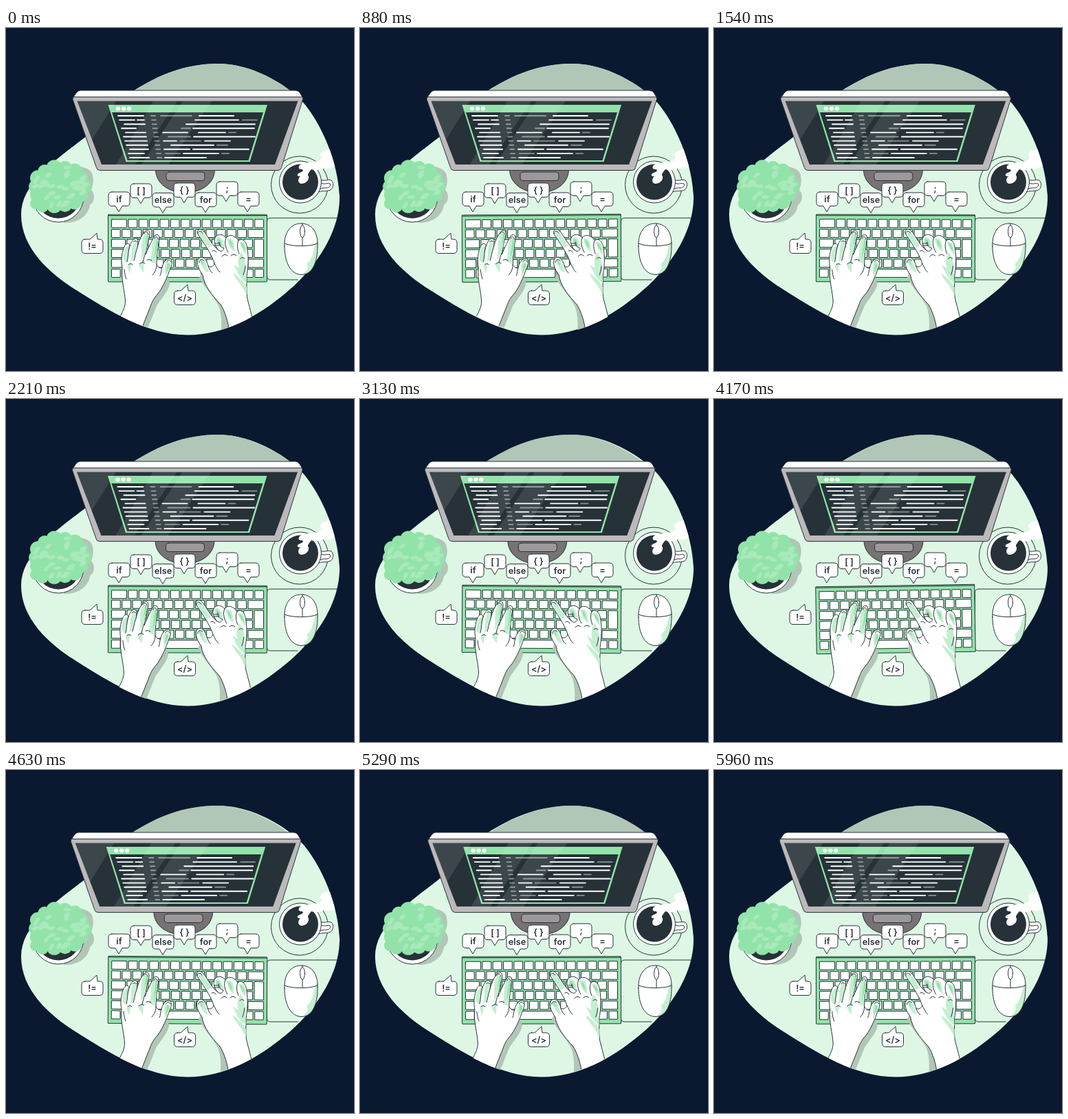
These frames come from a looping animation (506 by 500 pixels, 6000 ms). An HTML page:

```html
<!DOCTYPE html>
<html lang="en">
<head>
<meta charset="utf-8">
<title>Typing at the desk</title>
<style>
html, body { margin: 0; width: 100%; height: 100%; overflow: hidden; background: #0a192f; }
svg { display: block; width: 506px; height: 500px; }
text { font: 600 12.7px Inter, "Open Sans", sans-serif; text-anchor: middle; fill: #263238; }
.ink { stroke: #263238; stroke-width: 1; stroke-linejoin: round; stroke-linecap: round; }
.white { fill: #fff; }
.none { fill: none; }
.green { fill: #92e3a9; }
.pale { fill: #c3efd0; }
.dark { fill: #263238; }
.shade { fill: #b2c6b7; }
</style>
</head>
<body>
<svg viewBox="0 0 506 500">
  <defs>
    <path id="blob" d="M308 52C350 52 393 73 424 100C447 121 482 181 485 245C486 303 443 357 406 387C365 421 318 447.500 264 447.500C205 447.500 150 412 102 382C62 357 22 320 22 272C22 227 70 194 114 160C137 141 160 108 185 92C222 68 262 52 308 52Z"/>
    <clipPath id="desk"><use href="#blob"/></clipPath>
    <path id="shell" d="M405 318C404 298 414 285 429 285C445 285 454 298 453 318C453 342 445 359.500 430 359.500C414 359.500 405 342 405 318Z"/>
    <clipPath id="body"><use href="#shell"/></clipPath>
  </defs>
  <use href="#blob" fill="#def7e5"/>

  <g id="plant">
    <path class="shade" d="M92 200C108 201 126 204 126 216C128 222 126 230 124 236C131 244 128 254 122 258C120 274 104 285 84 284Z"/>
    <circle class="white ink" cx="76" cy="246" r="37"/>
    <circle class="dark" cx="76" cy="245" r="32.500"/>
    <g id="bush"></g>
  </g>

  <g id="cup">
    <circle class="none ink" cx="427" cy="228.500" r="41.500" stroke-width=".8"/>
    <path class="white ink" d="M455 221C464 224 468 220 473 222C477 226 476 233 472 236C466 239 460 236 452 240Z"/>
    <path class="none ink" d="M458 226C464 229 468 225 471 227C473 230 470 233 466 233C462 233 459 233 456 235"/>
    <circle class="white ink" cx="428" cy="224.500" r="30.500"/>
    <circle class="dark" cx="428" cy="224.500" r="26"/>
    <path class="white" clip-path="url(#desk)" d="M480 176C466 177 455 180 457 187C461 188 459 191 456 193C448 196 437 196 430 198C424 201 424 206 430 206C434 207 431 210 427 211C422 213 423 217 428 216C424 220 424 226 429 227C436 227 441 222 440 216C437 214 441 210 444 206C450 208 459 208 462 204C470 207 478 202 486 200Z"/>
  </g>

  <g id="mouse">
    <path class="none ink" d="M481 277H384.500Q379.500 277 379.500 282V362Q379.500 367 384.500 367H424"/>
    <path class="pale" d="M440 291C455 300 458 340 436 358L428 340Z"/>
    <use href="#shell" class="white"/>
    <path class="pale" clip-path="url(#body)" d="M453 310C446 316 450 334 437 344C441 348 438 354 430 360L456 362Z"/>
    <use href="#shell" class="none ink"/>
    <path class="none ink" d="M405 314C414 319 444 319 453 314M431 285V288M431 305V317.500"/>
    <ellipse class="white ink" cx="431" cy="296.500" rx="3.400" ry="9"/>
  </g>

  <g id="monitor">
    <path class="shade" d="M185 92C222 68 262 52 308 52C350 52 393 73 424 100H185Z"/>
    <path class="ink" fill="#777274" d="M217.500 206C217.500 227 237 240 260.500 240C284 240 303.500 227 303.500 206Z"/>
    <rect class="ink" fill="#9d999b" x="233" y="210" width="56" height="12.500" rx="4"/>
    <path class="white ink" d="M98 101C102 95 104 91 109 91H420C426 91 428 95 431 101Z"/>
    <path class="ink" fill="#bcb9bb" d="M99 100.500H429.500Q432.500 100.500 431.500 104L400.500 203.500Q399.500 207.500 396 207.500H136.500Q132.500 207.500 131.500 203.500L97 104Q96.500 100.500 99 100.500Z"/>
    <path class="dark" d="M103.500 106.500H424.500L391 199H139Z"/>
    <path class="green" d="M148.500 112H380L354.500 195H174.500Z"/>
    <path class="dark" d="M154 123H374L352.500 193H176.500Z"/>
    <g class="white">
      <ellipse cx="163" cy="117.500" rx="3.200" ry="2.900"/>
      <ellipse cx="171" cy="117.500" rx="3.200" ry="2.900"/>
      <ellipse cx="179" cy="117.500" rx="3.200" ry="2.900"/>
    </g>
    <g id="code" stroke-width="1.900" stroke-linecap="round"></g>
    <path class="white" opacity=".1" d="M103.500 106.500H160L125 163ZM214 106.500H249L188 199H160ZM257 106.500H299L236 199H197Z"/>
  </g>

  <g id="bubbles"></g>

  <g id="keyboard">
    <rect class="green ink" x="148.500" y="272" width="231" height="98" rx="1"/>
    <path class="none ink" d="M149 273.500H379" stroke-width=".7"/>
    <g id="keys"></g>
  </g>

  <g id="hands"><g clip-path="url(#desk)">
    <path class="shade" d="M232 354L238 372C237 384 222 398 218 408L203 445H180ZM286 352L281 364C290 380 303 393 309 405C314 417 314 434 312 450H340Z"/>
    <path class="white ink" d="M152 446C164 422 173 412 173.500 399C173 384 167 367 169 350C167 338 168 328 172 319C174 313 180 313 180 318C182 311 186 306 190 307C193 309 192 314 191 320C193 310 199 299 203 295.500C208 293.500 210 298 208.500 304C206 312 204 321 203 330C207 320 213 308 216 303C220 299 224 302 222.500 309C221 320 219 332 219 345C222 350 225 351 227 349C228 343 232 337 237 336C243 336 242 344 239 350C235 362 229 376 222 386C214 395 212 400 210 406L195 444Z"/>
    <path class="pale" d="M171 338C169 328 173 316 180 319C177 326 180 333 174 342ZM203 298C209 299 206 312 203 328L196 338C200 324 193 313 203 298ZM216 305C226 306 218 329 218 344L209 340C214 329 209 318 216 305ZM233 342C244 340 238 352 231 365C234 354 228 350 233 342ZM188 310C195 314 188 325 186 337L181 341C185 329 180 319 188 310ZM176 347L183 341L180 358ZM193 346L201 337L200 357Z"/>
    <path class="green" d="M177 319l3-1-3 12zM205 300q5 2 1 9l-4 9zM219 306q4 4 0 19l-4 12zM235 343q5-1 2 7l-4 8z"/>
    <path class="none ink" d="M180 318C177 326 178 335 176 341M191 320C188 328 188 334 186 339M203 328C201 333 200 337 199 341M219 345C219 352 216 357 213 360M227 349C225 354 226 358 224 361M201 300C201 296 207 296 207 301M216 307C216 303 221 303 221 308M234 341C234 338 239 337 240 341M185 312Q188 308 191 312M178 345Q181 342 184 345M194 344Q198 340 202 343M205 338Q209 336 212 339M172 352Q173 362 175 366"/>
    <path class="white ink" d="M325 446C324 430 318 412 312 403C299 389 288 375 286 360C280 352 276 342 280 336C286 331 292 338 294 347C298 350 302 347 303 343C300 333 292 320 286 311C282 304 275 298 280 294C285 291 290 299 293 304C299 314 305 321 309 324C304 318 301 310 305 304C310 299 316 301 320 306C325 299 334 303 338 310C344 305 350 312 351 322C353 335 352 350 350 362C350 380 349 389 352 399C355 410 358 422 363 443Z"/>
    <path class="pale" d="M342 327C349 336 349 348 350 372C341 366 338 360 331 345L339 350C336 342 338 332 342 327ZM330 357C340 364 347 371 350 378L350 391C345 375 333 367 330 357ZM282 337C290 337 291 345 295 356C290 357 283 347 282 337ZM281 296C289 297 292 307 300 318L294 320C288 311 279 302 281 296ZM306 306C313 302 316 311 318 320C309 320 304 314 306 306ZM321 307C331 304 332 314 333 326C325 323 324 315 321 307ZM339 312C349 310 350 319 350 331C344 326 343 319 339 312Z"/>
    <path class="green" d="M307 307q6 0 7 11q-7-3-7-11zM324 309q5 0 6 12q-5-4-6-12zM341 313q6 2 7 12q-5-4-7-12zM282 338q4 1 6 8q-5-2-6-8z"/>
    <path class="none ink" d="M279 300C279 295 284 295 286 299M281 342C280 338 285 336 288 339M309 324C313 327 316 325 317 321C312 320 310 316 310 312M320 306C317 312 319 320 323 327M338 310C335 316 337 324 339 329M304 314H311M303 317H312M303 343C306 348 307 353 311 356M294 347C296 352 297 355 300 357M314 333Q318 328 322 332M327 332Q331 328 335 332M341 336Q344 333 347 336M300 325Q304 323 306 327M348 347Q347 355 345 360"/>
  </g></g>
</svg>
<script>
const byId = id => document.getElementById(id);
const fill = (id, parts) => { byId(id).innerHTML = parts.join(''); };

let seed = 11;
const random = () => (seed = seed * 16807 % 2147483647) / 2147483647;

// Foliage: a scalloped rim, a core, a drooping corner and scattered lighter leaves.
const disc = (x, y, r) => `<circle class="green" cx="${x}" cy="${y}" r="${r}"/>`;
const rim = Array.from({ length: 14 }, (_, i) => {
  const a = i * Math.PI / 7;
  return disc(78 + 35 * Math.cos(a), 231 + 28 * Math.sin(a), i % 2 ? 10 : 11.5);
});
const leaves = Array.from({ length: 34 }, () => {
  const a = random() * 6.28, r = Math.sqrt(random());
  const x = 78 + 38 * r * Math.cos(a), y = 232 + 31 * r * Math.sin(a);
  return `<ellipse rx="5.5" ry="2.8" fill="#a9e9bb" transform="translate(${x} ${y}) rotate(${-60 + random() * 80})"/>`;
});
fill('bush', [
  ...rim, disc(43, 256, 8), disc(53, 260, 9),
  '<ellipse class="green" cx="78" cy="231" rx="37" ry="31"/>', ...leaves
]);

// Code rows: left column ends, then main column as "start-end", g marks grey.
const rows = [
  '163-200 g225-270 281-331', '165-187 191-201 275-338 g344-365', '172-202 262-362',
  '168-189 g255-268 272-361', '174-203 228-264 280-319 g324-334', '171-204 g236-268 273-362',
  '173-205 229-248 g253-283 289-326', '175-206 240-302 g307-322', '180-207 230-267 272-353',
  '178-201 g232-253 258-309 g314-324', '180-208 231-291'
];
fill('code', rows.flatMap((row, i) => {
  const y = 128 + i * 6.1, mark = 211 + i * .9;
  return `${row} g${mark}-${mark + 6}`.split(' ').map(part => {
    const [x1, x2] = part.replace('g', '').split('-');
    return `<path d="M${x1} ${y}H${x2}" stroke="${part[0] === 'g' ? '#89918f' : '#fff'}"/>`;
  });
}));

// Speech bubbles: label, left, top, tail tip and whether the tail points up.
const bubble = ([label, x, y, tip, up]) => {
  const base = up ? tip - 5 : tip, edge = up ? y : y + 20.5;
  const tail = up
    ? `H${base - 5}L${tip} ${y - 9}L${base + 6} ${y}H${x + 26}`
    : `H${x + 26}`;
  const bottom = up ? `H${x + 5}` : `H${base + 5}L${tip} ${edge + 8.5}L${base - 5} ${edge}H${x + 5}`;
  return `<path class="white ink" d="M${x + 5} ${y}${tail}q5 0 5 5v10.500q0 5-5 5${bottom}q-5 0-5-5V${y + 5}q0-5 5-5Z"/>
    <text x="${x + 15.5}" y="${y + 14.5}">${label}</text>`;
};
fill('bubbles', [
  ['if', 149, 239, 164], ['[ ]', 181, 227, 196], ['else', 213, 240.5, 228],
  ['{ }', 244, 226, 259], ['for', 275, 240, 290], [';', 306, 224, 320],
  ['=', 337, 239, 351], ['!=', 110, 308, 132, true], ['&lt;/&gt;', 244.5, 383, 264, true]
].map(bubble));

// Keys: evenly spaced runs between two x positions.
const key = (x, y, w, h = 12) =>
  `<rect class="white ink" x="${x}" y="${y}" width="${w}" height="${h}" rx=".6"/>`;
const run = (x1, x2, y, n) => {
  const pitch = (x2 - x1 + 2.6) / n;
  return Array.from({ length: n }, (_, i) => key(x1 + i * pitch, y, pitch - 2.6)).join('');
};
fill('keys', [
  key(153.5, 279, 22), run(178, 374.5, 279, 13),
  run(153.5, 349.5, 293.5, 13), key(352, 293.5, 22.5),
  key(153.5, 308, 20), run(176, 358.5, 308, 12), key(361, 308, 13.5, 26.5),
  key(153.5, 322.5, 24), run(180, 358.5, 322.5, 12),
  key(153.5, 337, 15), run(171, 349.5, 337, 12), key(352, 337, 22.5),
  run(153.5, 212, 351.5, 4), key(214.5, 351.5, 69), run(286, 374.5, 351.5, 6)
]);

const interpolate = (values, phase) => {
  const p = phase * (values.length - 1), i = Math.floor(p);
  return values[i] + ((values[i + 1] ?? values[i]) - values[i]) * (p - i);
};
const SHAKE = [0, -1, 2, -4, 4, -4, 4, -4, 2, -1, 0];
const SWAY = [0, 1, 0, -1, 0];
const SCALE = 1.2;
const FPS = 24;

function draw(ms) {
  const t = Math.floor((ms % 6000 + 5) * FPS / 1000) / FPS % 6;
  const typing = t % 1.5 / 1.5;
  const wobble = Math.max(0, t - 1.5) / 6;
  byId('hands').setAttribute('transform', `translate(${SCALE * interpolate(SHAKE, typing)} 0)`);
  byId('keyboard').setAttribute('transform', `rotate(${interpolate(SWAY, typing)} 264 321)`);
  byId('monitor').setAttribute('transform', `translate(${SCALE * interpolate(SHAKE, wobble)} 0)`);
}

const start = performance.now();
function tick() {
  draw(performance.now() - start);
  requestAnimationFrame(tick);
}
tick();
</script>
</body>
</html>
```
